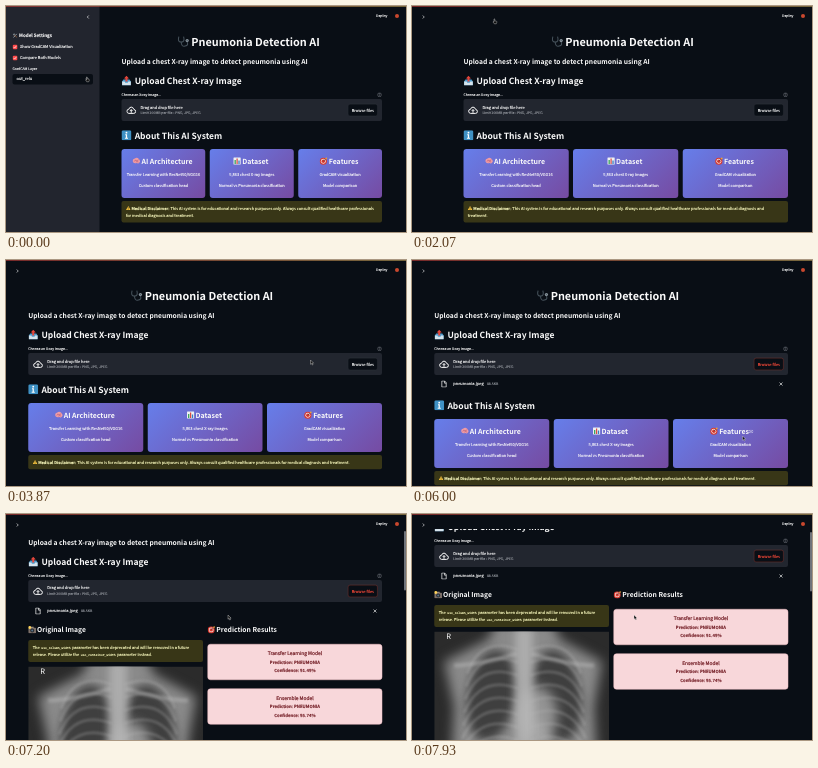
These frames come from a looping animation (400 px wide and 226 px high, 8000 ms). An HTML page:

```html
<!DOCTYPE html>
<html lang="en">
<head>
<meta charset="utf-8">
<title>Pneumonia Detection AI</title>
<style>
/* Scene is drawn at four times stage size; --x, --y, --w, --h are stage pixels. */
html, body { margin: 0; width: 100%; height: 100%; overflow: hidden; background: #090e15; }
#scene {
  position: absolute; width: 1600px; height: 904px; overflow: hidden;
  transform: scale(.25); transform-origin: 0 0;
  background: #090e15; color: #fafafa;
  font: 15.9px/28.4px "Noto Sans CJK JP", "Noto Sans CJK SC", "Noto Sans CJK", "Noto Sans", sans-serif;
  text-rendering: geometricPrecision;
  -webkit-text-stroke: .5px;
}
#scene * { box-sizing: border-box; }
.t, .b, .i { position: absolute; left: calc(var(--x, 0) * 4px); top: calc(var(--y, 0) * 4px); }
.t { white-space: nowrap; transform: translateY(calc(-50% - .07em)); }
.b { width: calc(var(--w) * 4px); height: calc(var(--h) * 4px); }
.i { width: calc(var(--s) * 4px); height: calc(var(--s) * 4px); transform: translate(-50%, -50%); }
.r { left: auto; right: calc(var(--x) * 4px); }
.full { left: 0; right: 0; width: auto; }
.layer { position: absolute; inset: 0; }
.e { width: 1.17em; height: 1.17em; margin-right: .13em; vertical-align: -.17em; }
svg { overflow: visible; }
.line { fill: none; stroke: currentColor; stroke-width: 1.6; }
.small { font-size: 13.9px; }
.dim { color: #979ba2; }
.h1, .h2, .h3, .sub { font-weight: 700; line-height: 1.2; -webkit-text-stroke: 0; }
.h1 { font-size: 43.4px; text-align: center; padding-right: 26px; }
.h2 { font-size: 34px; }
.h2 .e { margin-right: .38em; }
.h3 { font-size: 27px; }
.sub { font-size: 26.8px; }

#page { position: absolute; inset: 0; --k: 4; }
#main { position: absolute; top: 0; height: 904px; left: 89px; right: 96px; }
#bar { left: 0; top: 0; width: 1600px; height: 60px; background: #090e15; position: absolute; }
#stripe { position: absolute; width: 1600px; height: 2.4px; background: linear-gradient(90deg, #e9463f, #e8c267); }
#side { position: absolute; left: 0; width: 374px; height: 904px; background: #22252e; }
#thumb { background: #70747a; border-radius: 4px; }
.check { background: #ff4b4b; border-radius: 4px; }
.drop { background: #22262f; border-radius: 8px; }
.button { background: #090e15; border: 1.5px solid #3d4149; border-radius: 8px; text-align: center; line-height: 45px; }
.cards { display: grid; grid-template-columns: repeat(3, 1fr); gap: 17.8px; }
.card {
  position: relative; height: 196px; border-radius: 12px; text-align: center;
  background: linear-gradient(135deg, #667eea, #764ba2);
}
.card .t { left: 0; right: 0; }
.card .h3 { padding-right: 8px; font-size: 28px; }
.warn { background: #383617; color: #ffffc2; border-radius: 8px; padding: 14.5px 24px 14.5px 17.8px; }
.warn .e { margin-right: .2em; }
code { font: 12.2px "Noto Sans Mono", "DejaVu Sans Mono", monospace; padding: 1px 3px; }
.result { background: #f8d7da; color: #721c24; border: 2px solid #f3bfc5; border-radius: 12px; text-align: center; }
.result .t { left: 0; right: 0; font-weight: 700; font-size: 17px; }
.result .t:first-child { font-weight: 400; font-size: 19.4px; -webkit-text-stroke: .8px; }
#xray { -webkit-text-stroke: 0; }

#main, #side, #page, #cursor { animation: 8s linear infinite; }
#main { animation-name: widen; }
#side { animation-name: collapse; }
#page { animation-name: scroll; }
#cursor { animation-name: roam; animation-timing-function: ease-in-out; }
#thumb { animation: scroll 8s linear infinite, shrink 8s step-end infinite; }
.opener, .file, .results, .running, .link, .button, #about, .arrow, .hand, #note { animation: 8s step-end infinite; }
.opener { animation-name: opener; }
.file { animation-name: file; }
.results { animation-name: results; }
.running { animation-name: running; }
.link { animation-name: link; }
.button { animation-name: focus; }
.hand { animation-name: hand; }
.arrow { animation-name: arrow; }
#about { animation-name: about; }
#note { animation-name: oneline; }

@keyframes widen { 0%, 24.375% { left: 462px; animation-timing-function: ease; } 28.125%, 100% { left: 89px; } }
@keyframes collapse { 0%, 24.375% { left: 0; animation-timing-function: ease; } 28.125%, 100% { left: -746px; } }
@keyframes scroll {
  0%, 85% { margin-top: 0; }
  85.875% { margin-top: calc(var(--k) * -3.7px); }
  93.375% { margin-top: calc(var(--k) * -46px); }
  97.5%, 100% { margin-top: calc(var(--k) * -62px); }
}
@keyframes shrink { 0% { height: 336px; } 88.75%, 100% { height: 238px; } }
@keyframes roam {
  0%, 10% { left: 322px; top: 288px; }
  21%, 29% { left: 328px; top: 56px; }
  44%, 49% { left: 1218px; top: 400px; }
  54%, 60% { left: 1424px; top: 414px; }
  69%, 76% { left: 1322px; top: 704px; }
  83%, 100% { left: 888px; top: 404px; }
}
@keyframes opener { 0% { visibility: hidden; } 25%, 100% { visibility: visible; } }
@keyframes file { 0% { visibility: hidden; } 69.125%, 100% { visibility: visible; } }
@keyframes results { 0% { visibility: hidden; } 80%, 100% { visibility: visible; } }
@keyframes running { 0% { visibility: hidden; } 77.5% { visibility: visible; } 88.75%, 100% { visibility: hidden; } }
@keyframes link { 0% { visibility: hidden; } 70% { visibility: visible; } 76.6%, 100% { visibility: hidden; } }
@keyframes focus { 0% { color: #fafafa; } 55%, 100% { color: #ff4b3a; border-color: #d8432f; } }
@keyframes about { 0% { margin-top: 0; visibility: visible; } 69.125% { margin-top: 64px; visibility: visible; } 80%, 100% { visibility: hidden; } }
@keyframes oneline { 0% { white-space: normal; } 28.125%, 100% { white-space: nowrap; } }
@keyframes hand { 0% { visibility: visible; } 28% { visibility: hidden; } 53% { visibility: visible; } 61%, 100% { visibility: hidden; } }
@keyframes arrow { 0% { visibility: hidden; } 28% { visibility: visible; } 53% { visibility: hidden; } 61%, 100% { visibility: visible; } }
</style>
</head>
<body>
<svg width="0" height="0" style="position:absolute">
  <symbol id="steth" viewBox="0 0 16 16">
    <path d="M2 2Q0 9 5 9T8 2M5 9Q5 15 10 14T12 8" fill="none" stroke="#46525b" stroke-width="1.3"/>
    <circle cx="12.5" cy="7" r="2" fill="#8f9ba3"/><circle cx="12.5" cy="7" r="1" fill="#59656e"/>
  </symbol>
  <symbol id="tray" viewBox="0 0 16 16">
    <path d="M1 9L3 6H13L15 9V15H1Z" fill="#4f9fd0"/><path d="M1 9H5L6 11H10L11 9H15V15H1Z" fill="#d5e3ec"/>
    <path d="M8 0L12 4.5H9.6V9H6.4V4.5H4Z" fill="#e5463c"/>
  </symbol>
  <symbol id="info" viewBox="0 0 16 16">
    <rect width="16" height="16" rx="2.5" fill="#3f91c4"/><path d="M6 6.5H9V12H10.5V13.5H5.5V12H7V8H6Z" fill="#fff"/><circle cx="8" cy="3.8" r="1.5" fill="#fff"/>
  </symbol>
  <symbol id="brain" viewBox="0 0 16 16">
    <path d="M1 9Q0 4 5 3Q9 0 13 4Q17 8 14 11Q12 14 9 12Q2 14 1 9Z" fill="#ee9ba6"/>
    <path d="M4 9Q5 5 8 7T12 5M7 10Q9 8 12 10" fill="none" stroke="#b75b70" stroke-width="1.2"/>
  </symbol>
  <symbol id="chart" viewBox="0 0 16 16">
    <rect x="1" y="1" width="14" height="14" rx="1" fill="#eef1f2"/>
    <path d="M3 6H5.5V14H3Z" fill="#37a35a"/><path d="M6.8 3H9.2V14H6.8Z" fill="#d94a45"/><path d="M10.5 7H13V14H10.5Z" fill="#347fc4"/>
  </symbol>
  <symbol id="target" viewBox="0 0 16 16">
    <circle cx="7.5" cy="8.5" r="7" fill="#d8392f"/><circle cx="7.5" cy="8.5" r="4.8" fill="#f3e6e2"/>
    <circle cx="7.5" cy="8.5" r="3.4" fill="#d8392f"/><path d="M7.5 8.5L13 3" stroke="#473d3b" stroke-width="1.3"/><path d="M11 3L14 0V2H16L13 5Z" fill="#e5a13c"/>
  </symbol>
  <symbol id="tools" viewBox="0 0 16 16">
    <path d="M3 14L13 3" stroke="#a9b2b8" stroke-width="2.5"/><path d="M4 5L14 14" stroke="#8a5a3a" stroke-width="2.5"/><path d="M1 5L5 1L8 4L4 8Z" fill="#7e8990"/>
  </symbol>
  <symbol id="alert" viewBox="0 0 16 16">
    <path d="M8 1L16 15H0Z" fill="#f6c33b"/><path d="M8 5V10M8 11.5V13.5" stroke="#222" stroke-width="1.8"/>
  </symbol>
  <symbol id="camera" viewBox="0 0 16 16">
    <rect y="4" width="16" height="11" rx="2" fill="#7c6f68"/><rect x="5" y="2" width="6" height="3" fill="#97897f"/>
    <circle cx="8" cy="9.5" r="4" fill="#25292e"/><circle cx="8" cy="9.5" r="2" fill="#57758a"/><circle cx="3" cy="3.5" r="3" fill="#ffd45a"/>
  </symbol>
  <symbol id="cloud" viewBox="0 0 16 16">
    <path class="line" d="M4 13Q1 12.5 1 9.500T4 6.500Q5 3 8 3T12 6.500Q15 7 15 10T12 13ZM8 12V7M6 9L8 7L10 9"/>
  </symbol>
  <symbol id="doc" viewBox="0 0 16 16"><path class="line" d="M3 1H9.500L13 5V15H3ZM9 1V6H13"/></symbol>
  <symbol id="cross" viewBox="0 0 16 16"><path class="line" style="stroke-width:2.5" d="M2 2L14 14M14 2L2 14"/></symbol>
  <symbol id="right" viewBox="0 0 16 16"><path class="line" style="stroke-width:2.5" d="M5 2L11 8L5 14"/></symbol>
  <symbol id="down" viewBox="0 0 16 16"><path class="line" style="stroke-width:2" d="M2 5L8 11L14 5"/></symbol>
  <symbol id="tick" viewBox="0 0 16 16"><path class="line" style="stroke-width:2.5" d="M3 8L7 12L13 4"/></symbol>
  <symbol id="help" viewBox="0 0 16 16"><circle class="line" cx="8" cy="8" r="7"/><path class="line" d="M5.500 6.500Q6 4 8 4T10 7Q8 8 8 10M8 11V13"/></symbol>
  <symbol id="chain" viewBox="0 0 16 16"><path class="line" d="M7 4H4Q0 4 0 8T4 12H7M9 4H12Q16 4 16 8T12 12H9M5 8H11"/></symbol>
  <symbol id="runner" viewBox="0 0 16 16"><circle cx="10" cy="2.5" r="2" fill="currentColor"/><path class="line" d="M3 6L9 5L8 10L12 15M8 10L3 14M9 5L13 8"/></symbol>
</svg>

<div id="scene">
  <div id="page">
    <div id="main">
      <div class="t full h1" style="--y:36"><svg class="e"><use href="#steth"/></svg>Pneumonia Detection AI</div>
      <div class="t sub" style="--y:56">Upload a chest X-ray image to detect pneumonia using AI</div>
      <div class="t h2" style="--y:75.5"><svg class="e"><use href="#tray"/></svg>Upload Chest X-ray Image</div>
      <div class="t small" style="--y:88.7">Choose an X-ray image...</div>
      <svg class="i r dim" style="--x:-2;--y:88.7;--s:4.5"><use href="#help"/></svg>
      <div class="b full drop" style="--y:93;--h:22"></div>
      <svg class="i" style="--x:9.7;--y:104.3;--s:10"><use href="#cloud"/></svg>
      <div class="t" style="--x:19;--y:101.4">Drag and drop file here</div>
      <div class="t small dim" style="--x:19;--y:107.6">Limit 200MB per file • PNG, JPG, JPEG</div>
      <div class="b r button" style="--x:4.4;--y:98;--w:29.5;--h:12">Browse files</div>

      <div class="layer file">
        <svg class="i" style="--x:9.7;--y:124;--s:7"><use href="#doc"/></svg>
        <div class="t" style="--x:19;--y:124.2">pneumonia.jpeg <span class="small dim" style="margin-left:9px">88.5KB</span></div>
        <svg class="i r" style="--x:3;--y:124;--s:4"><use href="#cross"/></svg>
      </div>

      <div class="layer" id="about">
        <div class="t h2" style="--y:130"><svg class="e"><use href="#info"/></svg>About This AI System</div>
        <div class="t full cards" style="--y:143;transform:none">
          <div class="card">
            <div class="t h3" style="--y:12.7"><svg class="e"><use href="#brain"/></svg>AI Architecture</div>
            <div class="t" style="--y:25.5">Transfer Learning with ResNet50/VGG16</div>
            <div class="t" style="--y:36.7">Custom classification head</div>
          </div>
          <div class="card">
            <div class="t h3" style="--y:12.7"><svg class="e"><use href="#chart"/></svg>Dataset</div>
            <div class="t" style="--y:25.5">5,863 chest X-ray images</div>
            <div class="t" style="--y:36.7">Normal vs Pneumonia classification</div>
          </div>
          <div class="card">
            <div class="t h3" style="--y:12.7"><svg class="e"><use href="#target"/></svg>Features</div>
            <svg class="i link" style="--x:78;--y:12.5;--s:4.5"><use href="#chain"/></svg>
            <div class="t" style="--y:25.5">GradCAM visualization</div>
            <div class="t" style="--y:36.7">Model comparison</div>
          </div>
        </div>
        <div class="t full warn" id="note" style="--y:195;transform:none"><svg class="e"><use href="#alert"/></svg><b>Medical Disclaimer:</b> This AI system is for educational and research purposes only. Always consult qualified healthcare professionals for medical diagnosis and treatment.</div>
      </div>

      <div class="layer results">
        <div class="t h3" style="--y:143.3"><svg class="e"><use href="#camera"/></svg>Original Image</div>
        <div class="t h3" style="--x:179.3;--y:143.3"><svg class="e"><use href="#target"/></svg>Prediction Results</div>
        <div class="b warn" style="--y:153;--w:174.8;--h:22;white-space:nowrap">The <code>use_column_width</code> parameter has been deprecated and will be removed in a future<br>release. Please utilize the <code>use_container_width</code> parameter instead.</div>
        <svg class="b" id="xray" viewBox="0 0 175 140" style="--y:179.5;--w:174.8;--h:140;overflow:hidden">
          <defs>
            <g id="half">
              <ellipse cx="57" cy="64" rx="24" ry="46" fill="#3f3f3f" transform="rotate(9 57 64)" style="filter:blur(5px)"/>
              <path d="M20 34Q46 33 83 22" fill="none" stroke="#bdbdbd" stroke-width="4" opacity=".45" style="filter:blur(1.5px)"/>
              <g id="ribs" fill="none" stroke="#bdbdbd" stroke-width="3" opacity=".25" style="filter:blur(1px)"></g>
            </g>
          </defs>
          <rect width="175" height="140" fill="#2b2b2b"/>
          <path d="M62 -10H118L126 8L168 30L160 75L164 150H16L20 75L10 30L54 8Z" fill="#8a8a8a" style="filter:blur(6px)"/>
          <use href="#half"/><use href="#half" transform="translate(180) scale(-1 1)"/>
          <ellipse cx="104" cy="84" rx="19" ry="29" fill="#b0b0b0" opacity=".75" style="filter:blur(6px)"/>
          <rect x="81" y="-5" width="18" height="150" fill="#bcbcbc" opacity=".7" style="filter:blur(4px)"/>
          <text x="12" y="7.5" font-size="7.5" fill="#fff">R</text>
        </svg>
        <div class="b result" style="--x:179.3;--y:157;--w:174.7;--h:36">
          <div class="t" style="--y:9.3">Transfer Learning Model</div>
          <div class="t" style="--y:17.7">Prediction: PNEUMONIA</div>
          <div class="t" style="--y:26.2">Confidence: 91.49%</div>
        </div>
        <div class="b result" style="--x:179.3;--y:201.5;--w:174.7;--h:36">
          <div class="t" style="--y:9.3">Ensemble Model</div>
          <div class="t" style="--y:17.7">Prediction: PNEUMONIA</div>
          <div class="t" style="--y:26.2">Confidence: 95.74%</div>
        </div>
      </div>
    </div>
  </div>

  <div id="bar">
    <svg class="i opener" style="--x:11.5;--y:11;--s:4"><use href="#right"/></svg>
    <div class="running">
      <svg class="i dim" style="--x:326;--y:10.5;--s:5"><use href="#runner"/></svg>
      <div class="t small dim" style="--x:331;--y:10.5;font-size:12.5px">RUNNING...</div>
      <div class="t small" style="--x:355.5;--y:10.5">Stop</div>
    </div>
    <div class="t small" style="--x:370;--y:10.5">Deploy</div>
    <div class="i" style="--x:391;--y:10;--s:4;background:#c9472e;border-radius:50%"></div>
  </div>
  <div class="results">
    <div class="b" id="thumb" style="--k:-.13;--x:398;--y:16;--w:2"></div>
  </div>

  <div id="side">
    <svg class="i" style="--x:82;--y:11;--s:4;transform:translate(-50%,-50%) scaleX(-1)"><use href="#right"/></svg>
    <div class="t" style="--x:6.5;--y:30;font-size:18px;font-weight:700"><svg class="e" style="margin-right:.3em"><use href="#tools"/></svg>Model Settings</div>
    <svg class="i check" style="--x:9;--y:41;--s:4.4"><use href="#tick"/></svg>
    <div class="t" style="--x:14;--y:41">Show GradCAM Visualization</div>
    <svg class="i check" style="--x:9;--y:52;--s:4.4"><use href="#tick"/></svg>
    <div class="t" style="--x:14;--y:52">Compare Both Models</div>
    <div class="t small" style="--x:6.5;--y:63.5">GradCAM Layer</div>
    <div class="b" style="--x:6.5;--y:68;--w:80.5;--h:10.5;background:#090e15;border-radius:8px"></div>
    <div class="t" style="--x:10.5;--y:73">out_relu</div>
    <svg class="i" style="--x:81;--y:73;--s:3.5"><use href="#down"/></svg>
  </div>
  <div id="stripe"></div>

  <svg id="cursor" width="24" height="24" viewBox="0 0 24 24" style="position:absolute" fill="#111" stroke="#ddd" stroke-width="1.6">
    <path class="arrow" d="M0 0V17L4 13.5L7 20L10 18.5L7.200 12.5H12.5Z"/>
    <path class="hand" d="M0 -4Q2 -6 3 -4V3L10 5Q12 6 11 10L9 15H1L-4 8Q-4 5 0 8Z"/>
  </svg>
</div>
<script>
  const ribs = Array.from({ length: 8 }, (_, i) => {
    const y = 18 + i * 13;
    return `<path d="M84 ${y}Q46 ${y - 14} ${33 - i} ${y + 24}"/>`;
  });
  document.getElementById("ribs").innerHTML = ribs.join("");
</script>
</body>
</html>
```
